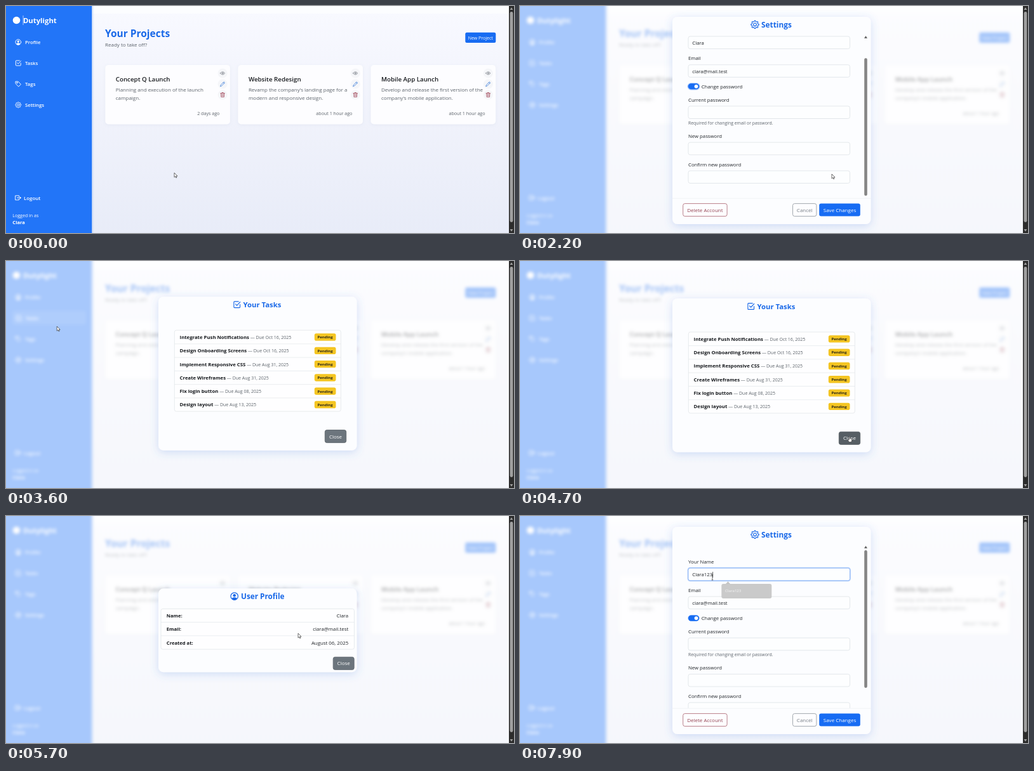
These frames come from a looping animation (800 px wide and 358 px high, 8000 ms). An HTML page:

```html
<!DOCTYPE html>
<html lang="en">
<head>
<meta charset="utf-8">
<title>Project dashboard</title>
<style>
html, body { margin: 0; width: 100%; height: 100%; overflow: hidden; background: #fff; }
svg { display: block; width: 800px; height: 358px; font-family: "Open Sans", "Noto Sans", sans-serif; }
text { white-space: pre; }
</style>
</head>
<body>
<svg id="stage" viewBox="0 0 800 358" xmlns="http://www.w3.org/2000/svg"></svg>
<script>
const LOOP = 8000;
const BLUE = '#1a69e8', INK = '#212529', GRAY = '#5d646b', LINE = '#dee2e6';
const stage = document.getElementById('stage');

// ---- drawing helpers; text is placed by the middle of its capitals
const text = (x, mid, s, size, fill = INK, weight = 400, anchor = 'start', id = '') =>
  `<text x="${x}" y="${(mid + size * 0.36).toFixed(2)}" font-size="${size}" fill="${fill}" font-weight="${weight}" text-anchor="${anchor}"${id && ` id="${id}"`}>${s}</text>`;
const rect = (x, y, w, h, fill, r = 0, extra = '') =>
  `<rect x="${x}" y="${y}" width="${w}" height="${h}" rx="${r}" fill="${fill}" ${extra}/>`;
const line = (x1, y1, x2, y2, c = LINE, w = 0.6) =>
  `<path d="M${x1} ${y1}L${x2} ${y2}" stroke="${c}" stroke-width="${w}"/>`;
const icon = (x, y, size, color, body) =>
  `<g transform="translate(${x} ${y}) scale(${size / 10})" fill="none" stroke="${color}" stroke-linecap="round" stroke-linejoin="round">${body(color)}</g>`;

// ---- icons on a 10 x 10 grid around zero
const person = c => `<circle r="4.6"/><circle cy="-1.1" r="1.8" fill="${c}" stroke="none"/><path d="M-3.4 3.2Q-2.6 1.3 0 1.3T3.4 3.2Q2 4.7 0 4.7T-3.4 3.2Z" fill="${c}" stroke="none"/>`;
const check = () => `<path d="M4.2 0V3.4Q4.2 4.3 3.3 4.3H-3.3Q-4.2 4.3-4.2 3.4V-3.3Q-4.2-4.2-3.3-4.2H2.2M-1.9-.6L-.1 1.3L4.4-3.6"/>`;
const tag = () => `<path d="M-4.2-4.2H-.3L4.4.5L.5 4.4L-4.2-.3Z"/><circle cx="-2" cy="-2" r=".7"/>`;
const gear = () => {
  let d = '';
  for (let i = 0; i < 32; i++) {
    const a = (i - 0.5) * Math.PI / 16, r = i % 4 < 2 ? 4.8 : 3.7;
    d += (i ? 'L' : 'M') + (r * Math.cos(a)).toFixed(2) + ' ' + (r * Math.sin(a)).toFixed(2);
  }
  return `<path d="${d}Z" stroke-width=".9"/><circle r="1.8" stroke-width=".9"/>`;
};
const exit = () => `<path d="M1.5-2V-3.6H-4.6V3.6H1.5V2M-1.5 0H4.8M2.9-1.9L4.8 0L2.9 1.9"/>`;
const eye = () => `<path d="M-4.8 0Q0-6 4.8 0Q0 6-4.8 0Z"/><circle r="1.4"/>`;
const pencil = () => `<path d="M-4.6 4.6L-3.6 1.7L2.6-4.5L4.5-2.6L-1.7 3.6ZM1.3-3.2L3.2-1.3"/>`;
const trash = () => `<path d="M-4.4-3H4.4M-1.4-3V-4.5H1.4V-3M-3.4-3L-3 4.6H3L3.4-3M-1.2-.8V2.6M1.2-.8V2.6"/>`;

// ---- dashboard
const NAV = [['Profile', 57, person], ['Tasks', 90, check], ['Tags', 123, tag], ['Settings', 156, gear]];
const CARDS = [
  ['Concept Q Launch', 'Planning and execution of the launch', 'campaign.', '2 days ago'],
  ['Website Redesign', 'Revamp the company’s landing page for a', 'modern and responsive design.', 'about 1 hour ago'],
  ['Mobile App Launch', 'Develop and release the first version of the', 'company’s mobile application.', 'about 1 hour ago']
];
const navItem = ([name, y, pic], i) =>
  rect(10, y - 11.5, 116, 22, '#fff', 3, `id="hl${i}" opacity="0"`) +
  `<g id="nav${i}">${icon(19.3, y, 9.4, '#fff', pic)}${text(30, y, name, 7.8, '#fff', 600)}</g>`;
const card = ([title, a, b, when], i) => {
  const x = 156.3 + i * 209.1;
  const tool = (y, c, pic) => `<circle cx="${x + 184.8}" cy="${y}" r="7.6" fill="#f5f6f9"/>` + icon(x + 184.8, y, 7.6, c, pic);
  return rect(x, 93, 196.6, 93.5, '#fdfdff', 5, 'filter="url(#soft)"') +
    text(x + 16.5, 115.5, title, 9.75, '#16191d', 600) +
    text(x + 16.5, 132.3, a, 8, GRAY) + text(x + 16.5, 144.8, b, 8, GRAY) +
    text(x + 180, 169, when, 7.1, GRAY, 400, 'end') +
    tool(106, '#7b8188', eye) + tool(123, '#3579d8', pencil) + tool(140, '#a04457', trash);
};
const page =
  rect(-30, -30, 860, 418, 'url(#sky)') + rect(136, -30, 660, 42, '#fff', 0, 'opacity=".65"') +
  rect(-30, -30, 165.3, 418, '#2275f8') + rect(135.3, -30, 4, 418, 'url(#edge)') +
  '<circle cx="16.5" cy="22.5" r="5.8" fill="#fff"/>' +
  text(27, 23, 'Dutylight', 11.3, '#fff', 700) +
  `<g id="mark">${line(27, 15, 27, 30, '#d5e4ff', 0.8)}</g>` +
  NAV.map(navItem).join('') +
  icon(19, 302.5, 9.4, '#fff', exit) + text(28, 303, 'Logout', 7.9, '#fff', 600) +
  text(10.3, 330, 'Logged in as', 7.05, '#fff') + text(10.3, 341, 'Clara', 7.6, '#fff', 700) +
  text(156, 43.5, 'Your Projects', 15.5, BLUE, 700) +
  text(156, 61.5, 'Ready to take off?', 8, GRAY) +
  rect(723.3, 41.8, 48, 16.2, '#186cf2', 2.5) + text(747.3, 50, 'New Project', 7, '#fff', 400, 'middle') +
  CARDS.map(card).join('');

// ---- dialogs
const panel = (y, h, id = '') => rect(240, y, 312.5, h, '#fcfdff', 8, `filter="url(#glow)" ${id && `id="${id}"`}`);
const field = (y, id = '') => rect(265, y, 254.5, 19.6, '#fdfeff', 3, `stroke="${LINE}" stroke-width=".8" ${id && `id="${id}"`}`);
const button = (x, y, w, s, fill, ink, stroke = 'none', id = '') =>
  rect(x, y, w, 20, fill, 3, `stroke="${stroke}" stroke-width=".8" ${id && `id="${id}"`}`) + text(x + w / 2, y + 10.2, s, 8, ink, 400, 'middle');
const label = (y, s) => text(265, y, s, 7.75);

const settings = `<g id="settings">${panel(17, 327, 'box')}
  <g id="head">${icon(370, 29.3, 13, BLUE, gear)}${text(380, 29.5, 'Settings', 11.85, BLUE, 700)}</g>
  <g clip-path="url(#bodyClip)"><g id="body">
    ${label(72, 'Your Name')}
    ${rect(263.6, 80.8, 257.3, 22.4, '#b7d1fb', 4.4, 'id="focus"')}${field(82.2, 'nameBox')}
    ${text(271.3, 92.5, '', 7.75, INK, 400, 'start', 'name')}<path id="caret" stroke="#222" stroke-width=".7"/>
    ${label(117, 'Email')}${field(127)}${text(271.3, 137.2, 'clara@mail.test', 7.75)}
    ${rect(263.4, 155.2, 20.2, 11.8, '#b9d3fd', 5.9, 'id="ring"')}
    ${rect(265, 156.8, 17, 8.6, '#fff', 4.3, 'id="track" stroke-width=".7"')}<circle id="knob" cy="161.1" r="2.9"/>
    ${text(285.7, 161.5, 'Change password', 7.8)}
    <g id="secret">${label(182.3, 'Current password')}${field(192.2)}
      ${text(265, 219, 'Required for changing email or password.', 6.88, GRAY)}
      ${label(239.7, 'New password')}${field(249.4)}
      ${label(284.3, 'Confirm new password')}${field(294.2)}</g>
  </g></g>
  <g id="bar"><path d="M542 51L544.5 47L547 51Z" fill="#666"/>${rect(542.2, 54, 4.6, 217, '#858585', 2.2, 'id="thumb"')}</g>
  <g id="foot">${line(240, 303.3, 552.5, 303.3, '#e8ebf0')}
    ${button(256.7, 311.6, 69.4, 'Delete Account', '#fdfdff', '#94404f', '#a9606d')}
    ${button(429.5, 311.6, 37.4, 'Cancel', '#fdfdff', '#777e85', '#8d949b')}
    ${button(471.2, 311.6, 64.6, 'Save Changes', '#176cf3', '#fff')}</g>
  <g id="tip"><path d="M323.5 107.5L327.5 103.3L331.5 107.5Z" fill="#c4c4c4"/>${rect(317.3, 107, 79, 23, '#c6c6c6', 3, 'opacity=".93"')}
    ${text(323, 118.3, 'Clara123', 6, '#ececec', 600)}</g></g>`;

const TASKS = [
  ['Integrate Push Notifications', 'Oct 16'], ['Design Onboarding Screens', 'Oct 16'],
  ['Implement Responsive CSS', 'Aug 31'], ['Create Wireframes', 'Aug 31'],
  ['Fix login button', 'Aug 08'], ['Design layout', 'Aug 13']
];
const taskRow = ([name, due], i) => {
  const y = 123 + i * 21.3;
  return (i ? line(265.3, y - 10.7, 527.3, y - 10.7) : '') +
    `<text x="273.6" y="${y + 2.8}" font-size="7.75" font-weight="700" fill="#16191d">${name}<tspan font-size="7" font-weight="400" fill="${GRAY}"> — Due ${due}, 2025</tspan></text>` +
    rect(485.8, y - 5.8, 33.7, 11.4, '#f4c522', 2.8) + text(502.6, y, 'Pending', 6, '#2b2718', 700, 'middle');
};
const tasks = `<g id="tasks">${panel(59, 242.5)}${icon(363.7, 71.5, 11.5, BLUE, check)}${text(373.5, 72, 'Your Tasks', 11.35, BLUE, 700)}
  ${rect(265.3, 112, 262, 128, '#fefeff', 3, `stroke="${LINE}" stroke-width=".7"`)}${TASKS.map(taskRow).join('')}
  ${button(502.3, 269.4, 33.4, 'Close', '#6c757d', '#fff', '#555c62', 'closeBtn')}</g>`;

const INFO = [['Name:', 'Clara'], ['Email:', 'clara@mail.test'], ['Created at:', 'August 06, 2025']];
const profile = `<g id="profile">${panel(114.3, 132)}${icon(359.7, 126.5, 12.5, BLUE, person)}${text(370, 127, 'User Profile', 11.75, BLUE, 700)}
  ${rect(244, 146.4, 304.4, 63.8, '#fefeff', 3, `stroke="${LINE}" stroke-width=".7"`)}
  ${INFO.map(([k, v], i) => (i ? line(244, 146.4 + i * 21.2, 548.4, 146.4 + i * 21.2) : '') +
    text(252.8, 157.3 + i * 21.3, k, 7.6, '#16191d', 700) + text(539.2, 157.3 + i * 21.3, v, 7.85, INK, 400, 'end')).join('')}
  ${button(515.2, 222.4, 33, 'Close', '#6c757d', '#fff', '#60686f')}</g>`;

const scrollbar = rect(792, 0, 8, 358, '#2c2c2c') + rect(793.6, 9, 4.8, 332, '#a0a0a0', 2.4) +
  '<path d="M793.6 6L796 2.2L798.4 6ZM793.6 352L796 355.8L798.4 352Z" fill="#a0a0a0"/>';
const pointer = `<g id="pointer">
  <path id="arrow" d="M0 0V7.2L1.7 5.7L2.8 8L3.9 7.5L2.8 5.2H5Z" fill="#fff" stroke="#333" stroke-width=".7" stroke-linejoin="round"/>
  <path id="hand" d="M-.7 0Q0-1 .7 0V3L3 3.6Q3.9 4 3.7 5L3 8.4H-.8L-2.7 5.4Q-2.4 4.3-.7 5.2Z" fill="#fff" stroke="#222" stroke-width=".6"/>
  <path id="beam" d="M-1.3-4H1.3M0-4V4M-1.3 4H1.3" stroke="#333" stroke-width=".7"/></g>`;

stage.innerHTML = `<defs>
  <linearGradient id="sky" x1="0" y1="0" x2="0" y2="1"><stop offset=".1" stop-color="#f8f9ff"/><stop offset=".5" stop-color="#f0f2fb"/><stop offset=".93" stop-color="#e8ecf8"/></linearGradient>
  <linearGradient id="edge"><stop stop-color="#a9c4ee" stop-opacity=".6"/><stop offset="1" stop-color="#dfe7f7" stop-opacity="0"/></linearGradient>
  <filter id="soft" x="-10%" y="-15%" width="120%" height="130%"><feDropShadow dx="0" dy="1" stdDeviation="2" flood-color="#7d8bb0" flood-opacity=".1"/></filter>
  <filter id="glow" x="-15%" y="-25%" width="130%" height="150%"><feDropShadow dx="0" dy="3" stdDeviation="7" flood-color="#4a7fe0" flood-opacity=".24"/></filter>
  <clipPath id="bodyClip"><rect id="clip" x="240" width="302"/></clipPath></defs>
  <g id="page">${page}</g>${rect(0, 0, 792, 358, '#fff', 0, 'id="veil"')}
  ${settings}${tasks}${profile}${scrollbar}${pointer}`;

const el = {};
stage.querySelectorAll('[id]').forEach(e => el[e.id] = e);
const set = (id, attrs) => { for (const k in attrs) el[id].setAttribute(k, attrs[k]); };
const show = (id, on) => set(id, { opacity: +on });

// ---- timing
const ramp = (t, a, d) => Math.max(0, Math.min(1, (t - a) / d));
const ease = p => p * p * (3 - 2 * p);
const between = (t, a, b) => t >= a && t < b;
const pulse = (t, a, b, d = 150) => ramp(t, a, d) * (1 - ramp(t, b, d));

const DIALOGS = [['settings', 800, 2500], ['tasks', 3400, 4800], ['profile', 5300, 6050], ['settings', 6380, 9000]];
const HOVERS = [[3, 600, 1000], [2, 2800, 3080], [1, 3130, 3500], [0, 5130, 5420], [3, 6300, 6650]];
const PATH = [
  [0, 265, 263], [200, 265, 263], [700, 46, 153], [950, 46, 153], [1500, 272, 214], [1650, 272, 214],
  [2050, 485, 263], [2200, 491, 265], [2430, 448, 320], [2550, 448, 320], [2860, 64, 146], [3000, 58, 125],
  [3250, 42, 88], [3450, 42, 88], [4300, 500, 268], [4600, 519, 277], [4800, 519, 277], [5200, 42, 55],
  [5330, 42, 55], [5700, 460, 185], [5950, 530, 230], [6080, 530, 230], [6360, 60, 155], [6470, 60, 155],
  [6700, 110, 167], [7180, 302, 96], [8000, 303, 97]
];
function cursorAt(t) {
  let i = 1;
  while (i < PATH.length - 1 && PATH[i][0] < t) i++;
  const [a, b] = [PATH[i - 1], PATH[i]], p = ease(ramp(t, a[0], b[0] - a[0]));
  return [a[1] + (b[1] - a[1]) * p, a[2] + (b[2] - a[2]) * p];
}

function drawSettings(t) {
  const k = ease(ramp(t, 1600, 150));
  const scroll = 34.3 * ease(ramp(t, 1760, 180)) * (1 - ease(ramp(t, 7230, 170)));
  const shift = 55 * (1 - k), on = t >= 1600, focused = t >= 7580;
  set('box', { y: 17 + shift, height: 327 - 2 * shift });
  set('head', { transform: `translate(0 ${shift})` });
  set('body', { transform: `translate(0 ${shift - scroll})` });
  set('clip', { y: 47 + shift, height: 256 - 2 * shift });
  set('foot', { transform: `translate(0 ${-shift})` });
  set('thumb', { y: 54 + scroll * 0.825 });
  show('secret', k); el.secret.setAttribute('opacity', k);
  show('bar', k === 1);
  show('ring', between(t, 1600, 2700));
  set('track', { fill: on ? '#176cf3' : '#fff', stroke: on ? '#176cf3' : '#c3c9d0' });
  set('knob', { cx: 269.5 + 8 * k, fill: on ? '#fff' : '#b9bfc6' });
  show('focus', focused);
  set('nameBox', { stroke: focused ? '#86b0f5' : LINE });
  const typed = Math.max(0, Math.min(3, Math.floor((t - 7600) / 100)));
  el.name.textContent = 'Clara' + '123'.slice(0, typed);
  const x = 271.8 + el.name.getComputedTextLength();
  set('caret', { d: `M${x} 88V97`, opacity: +focused });
  show('tip', ramp(t, 7780, 120));
}

function draw(t) {
  let veil = 0;
  ['settings', 'tasks', 'profile'].forEach(id => el[id].style.display = 'none');
  DIALOGS.forEach(([id, a, b]) => {
    const p = pulse(t, a, b);
    if (!p) return;
    const q = 1 - ramp(t, a, 300), up = -26 * Math.max(q * q, ease(ramp(t, b, 300)));
    el[id].style.display = '';
    set(id, { opacity: p, transform: `translate(0 ${up})` });
    veil = Math.max(veil, p);
  });
  drawSettings(t);
  set('veil', { opacity: 0.6 * veil });
  el.page.style.filter = veil ? `blur(${2.6 * veil}px)` : 'none';

  const hover = [0, 0, 0, 0];
  HOVERS.forEach(([i, a, b]) => hover[i] = Math.max(hover[i], pulse(t, a, b, 180)));
  hover.forEach((h, i) => {
    set('hl' + i, { opacity: 0.22 * h });
    set('nav' + i, { transform: `translate(${2 * h} 0)` });
  });
  show('mark', t < 750);
  set('closeBtn', { fill: between(t, 4500, 4950) ? '#565e64' : '#6c757d' });

  const [x, y] = cursorAt(t);
  const beam = t > 7150, hand = between(t, 4500, 4900) || between(t, 5900, 6130) || between(t, 2420, 2600);
  set('pointer', { transform: `translate(${x.toFixed(2)} ${y.toFixed(2)})` });
  show('beam', beam);
  show('hand', hand);
  show('arrow', !beam && !hand);
}

const start = performance.now();
function tick() {
  draw((performance.now() - start) % LOOP);
  requestAnimationFrame(tick);
}
tick();
</script>
</body>
</html>
```
